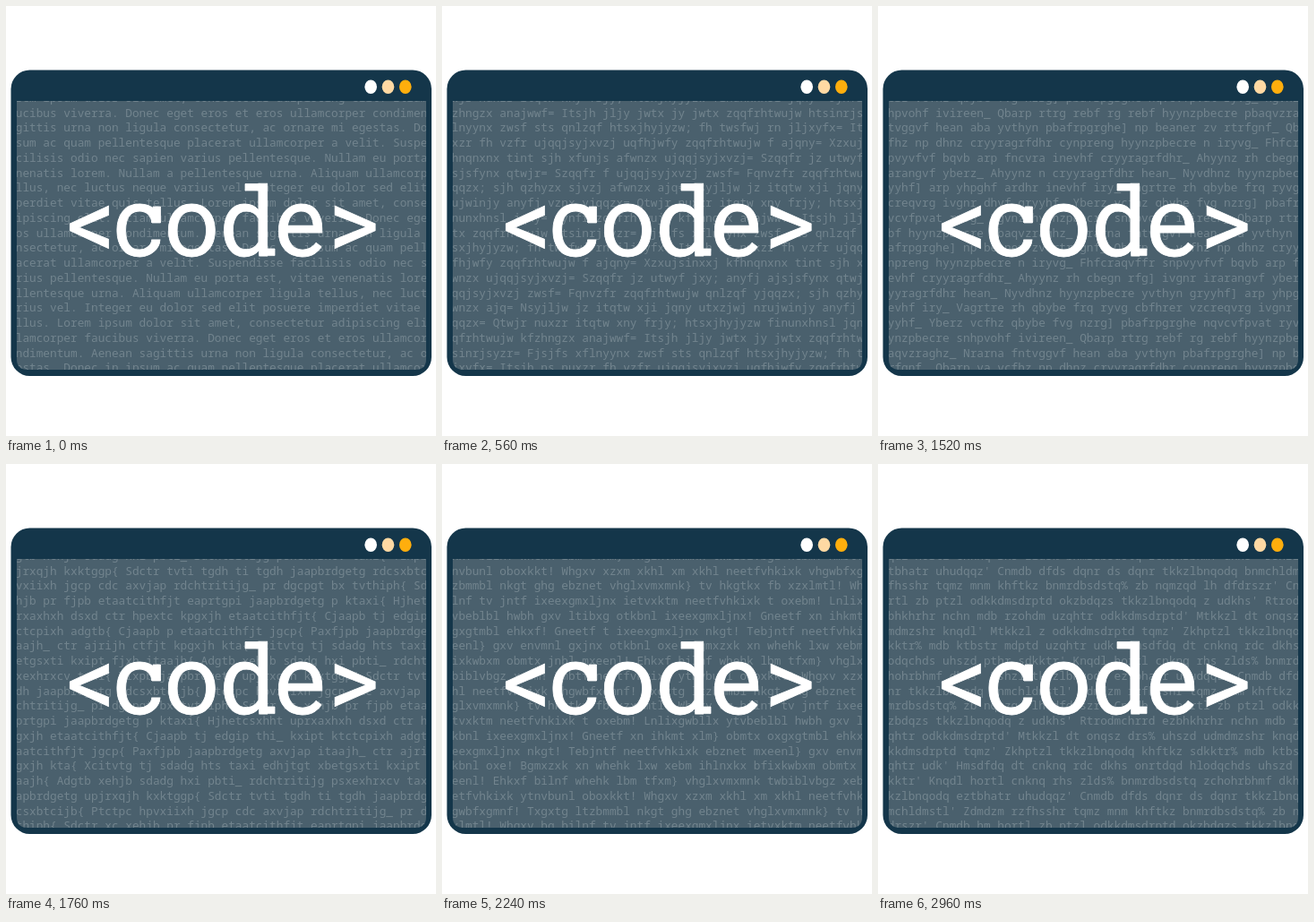
An HTML page for the animation above (3040 ms loop, 480x480 px).

```html
<!DOCTYPE html>
<html lang="en">
<head>
<meta charset="utf-8">
<title>Code window</title>
<style>
  html, body { margin: 0; width: 100%; height: 100%; overflow: hidden; background: #fff; }
  svg { display: block; width: 100vw; height: 100vh; }
  #rows { font: 12.78px "Noto Sans Mono", monospace; fill: #72848e; font-variant-ligatures: none; }
  #word { font: 400 108px Roboto, sans-serif; }
</style>
</head>
<body>
<svg viewBox="0 0 480 480">
  <clipPath id="pane"><path d="M12 106H469V394Q469 406 457 406H24Q12 406 12 394Z"/></clipPath>
  <rect x="5.5" y="71.5" width="469.5" height="341.5" rx="21" fill="#14364a"/>
  <g clip-path="url(#pane)">
    <rect x="12" y="106" width="457" height="300" fill="#4a606d"/>
    <g id="rows"></g>
  </g>
  <g id="dots">
    <ellipse cx="407.2" cy="90.3" rx="6.8" ry="7.7" fill="#fff"/>
    <ellipse cx="426.5" cy="90.3" rx="6.8" ry="7.7" fill="#ffd9a3"/>
    <ellipse cx="445.8" cy="90.3" rx="6.8" ry="7.7" fill="#ffae0d"/>
  </g>
  <g fill="#fff" stroke="#fff" stroke-width=".8">
    <text id="word" x="67.5 119 176.5 238.5 299.5 360" y="281 279 279 279 279 281">&lt;code&gt;</text>
    <!-- slab serifs of c and d -->
    <path d="M164 224H172.5V242H163ZM267 198.5H284V206H267ZM284 271H300V278.6H284Z"/>
  </g>
</svg>
<script>
const LOOP = 3040, STEP = 120, LEAD = 40;
const PUNCTUATION = "!\"#$%&'()*+,-./:;<=>?@[\\]^_`{|}~";
const LOWER = "abcdefghijklmnopqrstuvwxyz";
const alphabets = [LOWER, LOWER.toUpperCase(), PUNCTUATION];

const opening = "Lorem ipsum dolor sit amet, consectetur adipiscing elit. Etiam ullamcorper";
const rest = "faucibus viverra. Donec eget eros et eros ullamcorper condimentum. " +
  "Aenean sagittis urna non ligula consectetur, ac ornare mi egestas. " +
  "Donec in ipsum ac quam pellentesque placerat ullamcorper a velit. " +
  "Suspendisse facilisis odio nec sapien varius pellentesque. " +
  "Nullam eu porta est, vitae venenatis lorem. Nullam a pellentesque urna. " +
  "Aliquam ullamcorper ligula tellus, nec luctus neque varius vel. " +
  "Integer eu dolor sed elit posuere imperdiet vitae quis tellus.";
const wrapped = `${rest} ${opening} `.repeat(3).match(/\S.{0,72}(?= |$)/g);
const lines = [opening, ...wrapped].slice(0, 19);

const rows = lines.map((line, i) => {
  const row = document.createElementNS("http://www.w3.org/2000/svg", "text");
  row.setAttribute("x", -4.6);
  row.setAttribute("y", 106.9 + i * 16.75);
  return document.getElementById("rows").appendChild(row);
});

// Caesar shift within each character's own alphabet
const shiftChar = (char, by) => {
  const set = alphabets.find(letters => letters.includes(char));
  return set ? set[(set.indexOf(char) + by) % set.length] : char;
};

let shown = -1;
function draw() {
  const shift = Math.floor((performance.now() % LOOP + LEAD) / STEP);
  if (shift !== shown) {
    shown = shift;
    rows.forEach((row, i) => {
      row.textContent = [...lines[i]].map(char => shiftChar(char, shift)).join("");
    });
  }
  requestAnimationFrame(draw);
}
draw();
</script>
</body>
</html>
```
